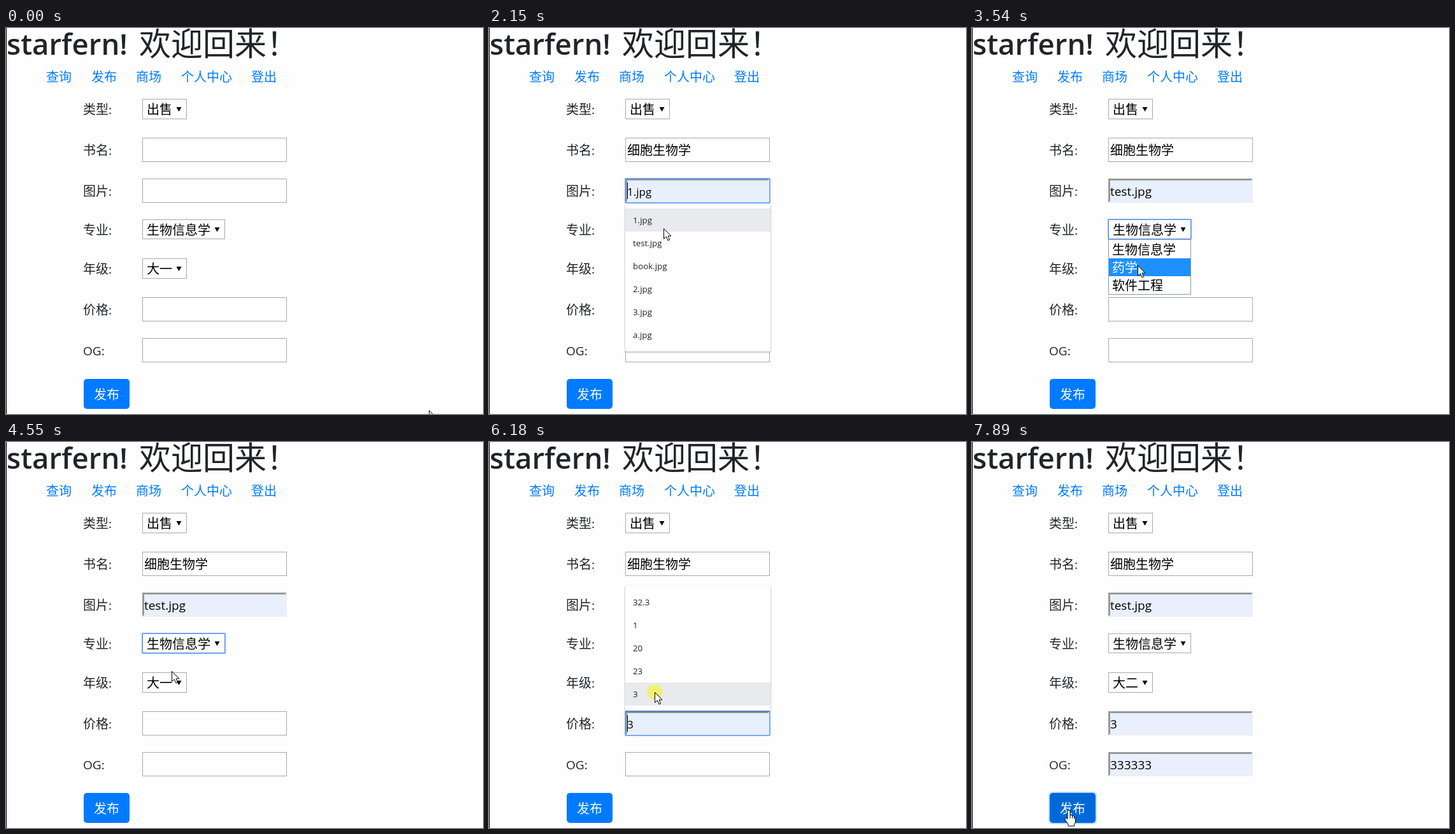
These frames come from a looping animation (749x605 px, 8 s). An HTML page:

```html
<!DOCTYPE html>
<html lang="zh-CN">
<head>
<meta charset="utf-8">
<title>发布</title>
<style>
html, body { margin: 0; width: 100%; height: 100%; overflow: hidden; background: #fefefe; }
svg { display: block; width: 749px; height: 605px; }
text { font: 350 20px "Noto Sans CJK SC", "Noto Sans CJK", sans-serif; fill: #212529; white-space: pre; }
.latin { font: 19px "Open Sans", "Noto Sans", sans-serif; }
.name { font: 600 45.5px "Open Sans", "Noto Sans", sans-serif; }
.hello { font-size: 50px; }
.nav { fill: #007bff; }
.value { fill: #000; }
.hint { font: 13.3px "Open Sans", "Noto Sans CJK SC", sans-serif; fill: #222; }
.preview { font: 17px "Open Sans", "Noto Sans CJK SC", sans-serif; fill: #000; }
.light { fill: #fff; }
.box { fill: #fefefe; stroke: #a9a9a9; }
.ring { fill: none; stroke: #4d90fe; stroke-width: 2; stroke-opacity: .75; }
.popup { fill: #fefefe; filter: drop-shadow(0 1px 1.5px rgba(0, 0, 0, .35)); }
</style>
</head>
<body>
<svg viewBox="0 0 749 605">
  <rect width="749" height="605" fill="#fefefe"/>
  <rect width="1" height="605"/>
  <text class="name" x="1" y="42">starfern!</text>
  <text class="hello" x="209" y="43">欢迎回来！</text>
  <g id="labels"></g>
  <g id="form"></g>
  <g id="overlay"></g>
  <g id="pointer"></g>
</svg>
<script>
const LOOP = 8000, STEP = 75, BLINK = 550;
const $ = id => document.getElementById(id);
const within = (t, [a, b]) => t >= a && t < b;
const text = (x, y, s, cls = '') => `<text class="${cls}" x="${x}" y="${y}">${s}</text>`;
const rect = (x, y, w, h, attrs) => `<rect x="${x}" y="${y}" width="${w}" height="${h}" ${attrs}/>`;

// Text inputs: focus span, popup span, value once picked, caret after it
const inputs = [
  { y: 172, focus: [600, 1750], open: [680, 1440], value: '细胞生物学', end: 317,
    hints: ['细胞生物学', '生物学'], row: 38, plain: true },
  { y: 236, focus: [1750, 3220], open: [1830, 2520], value: 'test.jpg', end: 282,
    hints: ['1.jpg', 'test.jpg', 'book.jpg', '2.jpg', '3.jpg', 'a.jpg'], row: 36 },
  { y: 422, focus: [5330, 6770], open: [5400, 6260], value: '3', end: 228,
    hints: ['32.3', '1', '20', '23', '3'], row: 36, up: true },
  { y: 486, focus: [6770, 7820], open: [6850, 7370], value: '333333', end: 282,
    hints: ['333333', '123123'], row: 36 }
];

const selects = [
  { y: 111, h: 32, w: 70, options: ['出售'], focus: [0, 0], open: [0, 0], pick: 0 },
  { y: 300, h: 31, w: 130, options: ['生物信息学', '药学', '软件工程'], focus: [3220, 4700], open: [3310, 4010], pick: 0 },
  { y: 361, h: 32, w: 70, options: ['大一', '大二', '大三', '大四'], focus: [4700, 5330], open: [4780, 5170], pick: 1 }
];

// Pointer moves: start, steps, target
const moves = [
  [70, 6, 300, 195], [1140, 3, 280, 233], [1670, 1, 283, 243], [2060, 3, 271, 339],
  [2595, 5, 260, 308], [3460, 2, 260, 372], [3620, 3, 262, 348], [4550, 2, 258, 370],
  [4850, 2, 245, 437], [5560, 5, 260, 398], [5950, 1, 260, 392], [6400, 5, 262, 505],
  [7050, 3, 258, 550], [7450, 5, 152, 577]
];
const clicks = [[600, 830], [1370, 1440], [1750, 2060], [2440, 2520], [3220, 3310], [3930, 4010],
  [4700, 4780], [5100, 5170], [5330, 5480], [6180, 6260], [6770, 6960], [7300, 7370]];

const ARROW = '<path d="M.5 .5V16.5L4.3 13L7 19L9.5 18L7 12H12Z" fill="#fff" stroke="#000"/>';
const BEAM = '<path d="M-4 -8.5H-1L0 -7.5L1 -8.5H4M0 -7.5V7.5M-4 8.5H-1L0 7.5L1 8.5H4" fill="none" stroke="#222" stroke-width="1.3"/>';
const HAND = '<path d="M-2 14V2Q-2 0 0 0T2 2V8Q4 6.500 5.500 9Q7.500 8 8.500 10.500Q10.500 10 10.500 13V18Q10 21 8.500 22V25H-1V22L-6 15Q-6.500 12 -4 12Z" fill="#fff" stroke="#000"/><path d="M2 8V13M5.500 9V13M8.500 11V14" stroke="#000"/>';

function pointerAt(t) {
  let x = 664, y = 599;
  for (const [start, n, tx, ty] of moves) {
    if (t < start) break;
    const k = Math.min(1, (Math.floor((t - start) / STEP) + 1) / n);
    const e = k * k * (3 - 2 * k);
    x += (tx - x) * e;
    y += (ty - y) * e;
  }
  return { x, y };
}

function filledBox(y) {
  return rect(214, y, 227, 38, 'fill="#e8f0fe"') +
    `<path d="M214 ${y}h227l-3 3H217v32l-3 3z" fill="#999"/>` +
    `<path d="M441 ${y}v38H214l2-2h223v-34z" fill="#eee"/>`;
}

function popupOf(f) {
  const h = f.hints.length * f.row + 16;
  return { y: f.up ? f.y - 1 - h : f.y + 39, h };
}

function drawInput(f, t, p) {
  const focused = within(t, f.focus), open = within(t, f.open), done = t >= f.open[1];
  const top = popupOf(f).y + 8;
  const hover = open ? Math.floor((p.y - top) / f.row) : -1;
  const hint = f.hints[hover];
  const base = f.y + 27;
  let form = (done || hint) && !f.plain ? filledBox(f.y) : rect(214.5, f.y + .5, 226, 37, 'class="box"');
  if (done) form += text(217, base, f.value, f.plain ? 'value' : 'latin value');
  else if (hint) form += text(217, base, hint, 'preview');
  if (focused) {
    form += rect(214, f.y, 227, 38, 'rx="1" class="ring"');
    const lit = !done || Math.floor((t - f.open[1]) / BLINK) % 2 === 0;
    if (lit) form += rect(done ? f.end : 217, f.y + 6, 1, 26, '');
  }
  let over = '';
  if (open) {
    const box = popupOf(f);
    over = rect(214, box.y, 228, box.h, 'rx="2" class="popup"');
    if (hint) over += rect(214, top + hover * f.row, 228, f.row, 'fill="#e8eaed"');
    f.hints.forEach((s, i) => { over += text(226, top + (i + .5) * f.row + 4.5, s, 'hint'); });
  }
  return [form, over];
}

function drawSelect(s, t, p) {
  const mid = s.y + s.h / 2, ax = 214 + s.w - 12.5;
  const current = t >= s.open[1] ? s.pick : 0;
  let form = rect(214.5, s.y + .5, s.w - 1, s.h - 1, 'class="box"') +
    text(221, mid + 8, s.options[current], 'value') +
    `<path d="M${ax - 4} ${mid - 3}h8l-4 7z"/>`;
  if (within(t, s.focus)) form += rect(214, s.y, s.w, s.h, 'rx="1" class="ring"');
  let over = '';
  if (within(t, s.open)) {
    const top = s.y + s.h + 2, n = s.options.length;
    const hover = Math.max(0, Math.min(n - 1, Math.floor((p.y - top) / 28)));
    over = rect(214.5, top - 1.5, s.w - 1, n * 28 + 2, 'fill="#fefefe" stroke="#7f9db9"') +
      rect(215, top + hover * 28, s.w - 2, 28, 'fill="#1e90ff"');
    s.options.forEach((o, i) => {
      over += text(220, top + i * 28 + 21.5, o, i === hover ? 'light' : 'value');
    });
  }
  return [form, over];
}

function drawButton(t, hot) {
  const press = t >= 7890 ? 2 : t >= 7820 ? 1 : 0;
  const ring = press ? rect(122 - press, 550 - press, 72 + 2 * press, 47 + 2 * press, 'rx="6" fill="#007bff" opacity=".25"') : '';
  return ring + rect(122, 550, 72, 47, `rx="5" fill="${hot ? '#0069d9' : '#007bff'}"`) + text(138, 582, '发布', 'light');
}

const shown = {};
function put(id, html) {
  if (shown[id] !== html) $(id).innerHTML = shown[id] = html;
}

function draw(t) {
  const p = pointerAt(t);
  const parts = [...inputs.map(f => drawInput(f, t, p)), ...selects.map(s => drawSelect(s, t, p))];
  const hot = p.x > 122 && p.x < 194 && p.y > 550 && p.y < 597;
  const typing = p.x > 214 && p.x < 441 && !within(t, selects[2].open) &&
    inputs.some(f => p.y > f.y && p.y < f.y + 38);
  put('form', parts.map(a => a[0]).join('') + drawButton(t, hot));
  put('overlay', parts.map(a => a[1]).join(''));
  const glow = clicks.some(c => within(t, c)) ? '<circle r="12" fill="#f5f14b" opacity=".75"/>' : '';
  put('pointer', `<g transform="translate(${Math.round(p.x)} ${Math.round(p.y)})">${glow}${hot ? HAND : typing ? BEAM : ARROW}</g>`);
}

const nav = [[63, '查询'], [134, '发布'], [204, '商场'], [275, '个人中心'], [385, '登出']];
const labels = [[135, '类型'], [199, '书名'], [263, '图片'], [324, '专业'], [385, '年级'], [449, '价格']];
put('labels', nav.map(([x, s]) => text(x, 84, s, 'nav')).join('') +
  labels.map(([y, s]) => text(121, y, s) + text(161, y, ':', 'latin')).join('') +
  text(121, 513, 'OG:', 'latin'));

const begin = performance.now();
function tick() {
  draw((performance.now() - begin) % LOOP);
  requestAnimationFrame(tick);
}
tick();
</script>
</body>
</html>
```
